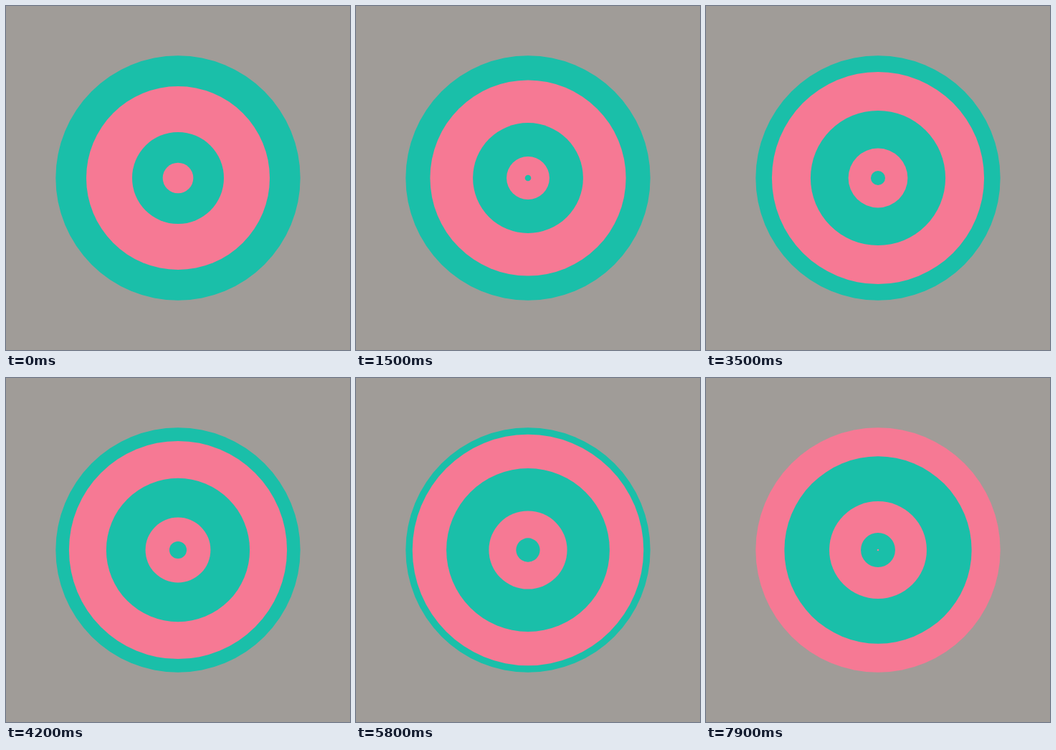
An HTML page with a canvas for the animation above (8000 ms loop, 480x480 px).

```html
<!DOCTYPE html>
<html lang="en">
<head>
<meta charset="utf-8">
<title>Growing rings</title>
<style>
html, body { margin: 0; height: 100%; overflow: hidden; background: #a09c98; }
canvas { display: block; }
</style>
</head>
<body>
<canvas id="stage" width="480" height="480"></canvas>
<script>
const ctx = document.getElementById('stage').getContext('2d');
const LOOP = 8000, STEP = 100, CYCLE = 7440;
const UNIT = 64 / 3;
const STOPS = [0, 1, 3, 6, 8]; // radii a ring passes through, in units
const COLORS = ['#1abfa9', '#f67994'];

function disc(radius, color) {
  ctx.fillStyle = COLORS[color % 2];
  ctx.beginPath();
  ctx.arc(240, 240, radius * UNIT, 0, Math.PI * 2);
  ctx.fill();
}

function draw(ms) {
  const time = Math.floor((ms % LOOP + 0.01) / STEP) * STEP % LOOP;
  const cycle = Math.floor(time / CYCLE);
  const phase = time / CYCLE - cycle;
  ctx.fillStyle = '#a09c98';
  ctx.fillRect(0, 0, 480, 480);
  disc(8, cycle);
  for (let i = 3; i >= 0; i--) {
    disc(STOPS[i] + (STOPS[i + 1] - STOPS[i]) * phase, cycle + i);
  }
}

let start;
function tick(now) {
  start ??= now;
  draw(now - start);
  requestAnimationFrame(tick);
}
draw(0);
requestAnimationFrame(tick);
</script>
</body>
</html>
```
